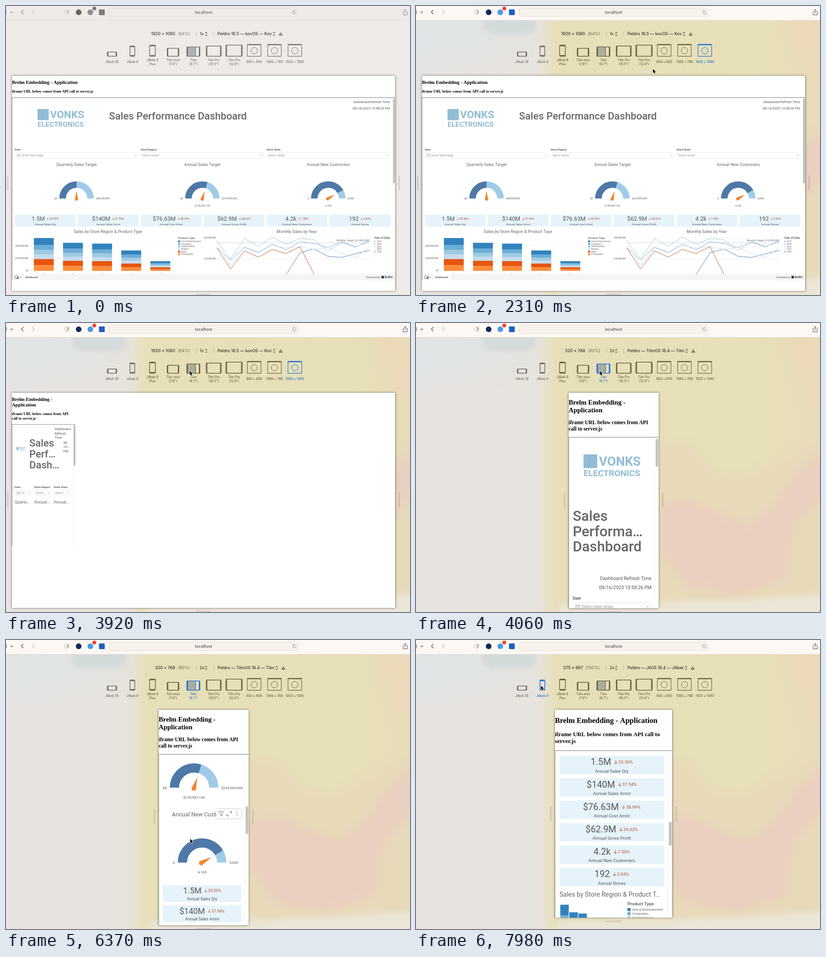
These frames come from a looping animation (884 px wide and 634 px high, 8000 ms). An HTML page with a canvas:

```html
<!DOCTYPE html>
<html lang="en">
<head>
<meta charset="utf-8">
<title>Responsive dashboard preview</title>
<style>
html, body { margin: 0; width: 100%; height: 100%; overflow: hidden; background: #efebe7; }
canvas { display: block; width: 884px; height: 634px; }
</style>
</head>
<body>
<canvas id="stage"></canvas>
<script>
const W = 884, H = 634, LOOP = 8000, STEP = 70, PAGE_TOP = 153;
const SANS = 'Roboto, sans-serif', UI = 'Inter, sans-serif', SERIF = '"Liberation Serif", serif';
const BLUE = '#1b6fdd', GREY = '#666', INK = '#555';
const canvas = document.getElementById('stage');
const ratio = window.devicePixelRatio || 1;
canvas.width = W * ratio;
canvas.height = H * ratio;
const ctx = canvas.getContext('2d');

// ---- helpers ----
function text(str, x, y, size, color = GREY, align = 'left', weight = 400, font = SANS) {
  ctx.font = `${weight} ${size}px ${font}`;
  ctx.fillStyle = color;
  ctx.textAlign = align;
  ctx.fillText(str, x, y + size * 0.35);
  return ctx.measureText(str).width;
}
function box(x, y, w, h, color, r = 0) {
  ctx.fillStyle = color;
  ctx.beginPath();
  ctx.roundRect(x, y, w, h, r);
  ctx.fill();
}
function frame(x, y, w, h, color, r = 0, width = 1) {
  ctx.strokeStyle = color;
  ctx.lineWidth = width;
  ctx.beginPath();
  ctx.roundRect(x, y, w, h, r);
  ctx.stroke();
}
function disc(x, y, r, color) {
  ctx.fillStyle = color;
  ctx.beginPath();
  ctx.arc(x, y, r, 0, 7);
  ctx.fill();
}
function line(points, color, width = 1, dash = []) {
  ctx.strokeStyle = color;
  ctx.lineWidth = width;
  ctx.setLineDash(dash);
  ctx.beginPath();
  points.forEach(([x, y]) => ctx.lineTo(x, y));
  ctx.stroke();
  ctx.setLineDash([]);
}
function shape(points, color) {
  ctx.fillStyle = color;
  ctx.beginPath();
  points.forEach(([x, y]) => ctx.lineTo(x, y));
  ctx.closePath();
  ctx.fill();
}
function at(x, y, scale, draw) {
  ctx.save();
  ctx.translate(x, y);
  ctx.scale(scale, scale);
  draw();
  ctx.restore();
}
function clipTo(x, y, w, h) {
  ctx.beginPath();
  ctx.rect(x, y, w, h);
  ctx.clip();
}
// Linear interpolation through [time, ...values] keys.
function track(keys, t) {
  const i = keys.findIndex(k => k[0] > t);
  if (i === 0) return keys[0].slice(1);
  if (i < 0) return keys[keys.length - 1].slice(1);
  const a = keys[i - 1], b = keys[i], f = (t - a[0]) / (b[0] - a[0]);
  return a.slice(1).map((v, j) => v + (b[j + 1] - v) * f);
}

// ---- window backdrop ----
const backdrop = document.createElement('canvas');
backdrop.width = W;
backdrop.height = H;
(function paintBackdrop(g) {
  const base = g.createLinearGradient(0, 0, W, 0);
  [[0, '#e7e3e1'], [.3, '#e7e3dd'], [.318, '#e7e2cf'], [.35, '#e6dfb7'], [.85, '#e7e0b8'], [1, '#e9dcb9']]
    .forEach(([p, c]) => base.addColorStop(p, c));
  g.fillStyle = base;
  g.fillRect(0, 0, W, H);
  const blob = (color, blur, points) => {
    g.filter = `blur(${blur}px)`;
    g.fillStyle = color;
    g.beginPath();
    points.forEach(([x, y]) => g.lineTo(x, y));
    g.fill();
  };
  blob('#e0e5e5', 25, [[-30, 20], [150, 20], [240, 70], [120, 110], [-30, 130]]);
  blob('#d3dada', 5, [[146, 20], [262, 20], [262, 52], [240, 62], [165, 62], [146, 50]]);
  blob('#e8dab9', 8, [[520, 275], [560, 255], [605, 268], [650, 325], [720, 335], [780, 300], [900, 240], [900, 650], [520, 650]]);
  blob('#e9cfbf', 10, [[535, 400], [595, 386], [660, 415], [730, 440], [785, 395], [830, 330], [900, 270],
    [900, 370], [830, 440], [810, 560], [700, 600], [590, 575], [535, 500]]);
  blob('#ebd9ba', 14, [[800, 20], [900, 20], [900, 220], [850, 150]]);
  blob('#ebe5d6', 7, [[310, 616], [540, 612], [720, 606], [900, 594], [900, 660], [310, 660]]);
})(backdrop.getContext('2d'));

// ---- browser chrome ----
const setups = {
  desktop: { dims: '1920 × 1080', x: 317.5, zoom: '(64%)', dpr: '1x', env: 'Peldro 16.5 — kovOS — Kov', pick: 9 },
  tablet: { dims: '320 × 768', x: 326, zoom: '(90%)', dpr: '2x', env: 'Peldro — TilmOS 16.4 — Tilm', pick: 4 },
  phone: { dims: '375 × 667', x: 322, zoom: '(100%)', dpr: '2x', env: 'Peldro — JilOS 16.4 — Jilbek', pick: 1 }
};
// [center x, width, height, kind, label lines]
const devices = [
  [232, 22, 11, 'device', 'Jilbek SE'], [276.5, 12, 24, 'device', 'Jilbek 8'], [320.5, 14, 26, 'device', 'Jilbek 8', 'Plus'],
  [365.5, 27, 19, 'device', 'Tilm mini', '(7.9")'], [410, 30, 22, 'split', 'Tilm', '(9.7")'],
  [454.5, 34, 24, 'device', 'Tilm Pro', '(10.5")'], [499, 37, 26, 'device', 'Tilm Pro', '(12.9")'],
  [543, 31, 27.5, 'screen', '800 × 600'], [587.5, 31, 27.5, 'screen', '1366 × 768'], [632, 31, 27.5, 'screen', '1920 × 1080']
];
function deviceIcon([cx, w, h, kind, ...label], color) {
  const x = cx - w / 2, y = 111 - h, wide = w > h;
  const [ix, top, bottom] = kind === 'screen' ? [1.2, 2.6, 1.2] : wide ? [3, 1.6, 1.6] : [1.5, 3.2, 3.2];
  ctx.fillStyle = color;
  ctx.beginPath();
  ctx.roundRect(x, y, w, h, kind === 'screen' ? 1 : 2.5);
  ctx.rect(x + ix, y + top, w - 2 * ix, h - top - bottom);
  ctx.fill('evenodd');
  if (kind === 'screen') frame(cx - 7, 91, 14, 14, color, 7);
  if (kind === 'split') {
    box(x + 3, y + 1.6, 16, h - 3.2, 'rgba(115,125,130,.5)');
    box(x + 19, y + 1.6, 1.2, h - 3.2, color);
  }
  label.forEach((s, i) => text(s, cx, (label.length > 1 ? 118.5 : 123) + i * 8.8, 6.9, color, 'center', 500, UI));
}
function toolbar(active) {
  const dark = active ? '#4b4846' : '#8a8683', faint = active ? '#c2bdb9' : '#cdc8c4';
  box(0, 0, W, 31, active ? '#fdf8f4' : '#f0ebe8');
  box(0, 31, W, 1, active ? '#e0d9cf' : '#dad5d1');
  box(0, 9, 1, 9, dark);
  line([[10, 12.5], [12.5, 15], [15, 12.5]], dark, 1.1);
  line([[38, 9], [33.5, 13.5], [38, 18]], dark, 1.3);
  line([[57.5, 9], [62, 13.5], [57.5, 18]], faint, 1.3);
  const shield = new Path2D('M133 8.5 L137.5 10 V14 Q137 17 133 19 Q129 17 128.5 14 V10 Z');
  ctx.strokeStyle = faint;
  ctx.lineWidth = 1;
  ctx.stroke(shield);
  ctx.save();
  clipTo(133, 5, 8, 16);
  ctx.fillStyle = faint;
  ctx.fill(shield);
  ctx.restore();
  disc(159, 13.8, 6.2, active ? '#0f2a5c' : '#666361');
  disc(184.5, 13.8, 6.2, active ? '#4a9be8' : '#908c89');
  disc(193.2, 5.6, 4.1, active ? '#f43b30' : '#6f7480');
  box(203.5, 7.5, 12.5, 12.5, active ? '#1d5fc4' : '#7d7976', 1);
  box(225.5, 4.5, 413, 18.5, active ? '#f8f2ed' : '#f1ece8', 5);
  frame(225.5, 4.5, 413, 18.5, active ? '#e3ddd7' : '#dbd6d2', 5);
  text('localhost', 432.5, 14, 8.9, active ? '#3c3937' : '#4d4a48', 'center', 400, UI);
  ctx.strokeStyle = '#8b8784';
  ctx.lineWidth = 1;
  ctx.beginPath();
  ctx.arc(630.5, 14, 3.6, -0.4, 4.8);
  ctx.stroke();
  line([[629.5, 8.8], [631.8, 10.5], [629.8, 12.3]], '#8b8784');
  line([[871, 12], [869, 12], [869, 19.5], [878, 19.5], [878, 12], [876, 12]], dark);
  line([[873.5, 16], [873.5, 7.5]], dark);
  line([[871, 9.7], [873.5, 7.2], [876, 9.7]], dark);
}
function deviceBar(mode, active) {
  const s = setups[mode], ink = active ? '#3a3620' : '#3b3937', soft = active ? '#716c50' : '#7b7774';
  const chevrons = x => {
    line([[x - 2, 59.6], [x, 57.6], [x + 2, 59.6]], ink, 1.1);
    line([[x - 2, 62.8], [x, 64.8], [x + 2, 62.8]], ink, 1.1);
  };
  const w = text(s.dims, s.x, 61, 9, ink, 'left', 500, UI);
  text(s.zoom, s.x + w + 6, 61, 9, soft, 'left', 400, UI);
  text(s.dpr, 423.8, 61, 8.8, ink, 'left', 500, UI);
  chevrons(438);
  [416.5, 454.5].forEach(x => box(x - .5, 55.5, 1, 11, active ? '#b5ae8b' : '#c4bfbb'));
  const end = 462.5 + text(s.env, 462.5, 61, 9, ink, 'left', 500, UI);
  chevrons(end + 5);
  shape([[end + 15, 65], [end + 19.5, 57], [end + 24, 65]], soft);
  box(end + 19, 59.5, 1.1, 3, '#eee6c8');
  box(end + 19, 63.2, 1.1, 1, '#eee6c8');
  devices.forEach((d, i) => deviceIcon(d, !active ? '#75716e' : i === s.pick ? BLUE : i < 2 ? '#706c66' : '#68623f'));
}

// ---- page shell ----
function page(x, w, h) {
  const grip = 'rgba(90,80,60,.17)', mid = Math.min(388, PAGE_TOP + h / 2);
  box(x - 10.5, mid - 16.5, 3, 33, grip, 1.5);
  box(x + w + 7.5, mid - 16.5, 3, 33, grip, 1.5);
  box(415, PAGE_TOP + h + 6.5, 34, 3, grip, 1.5);
  ctx.save();
  ctx.shadowColor = 'rgba(0,0,0,.6)';
  ctx.shadowBlur = 4 * ratio;
  box(x, PAGE_TOP, w, h, '#fff');
  ctx.restore();
}
// Draws both headings and returns the top of the embedded frame.
function headings(x, k, titleLines, noteLines) {
  let y = 33.6;
  titleLines.forEach((s, i) => text(s, x, PAGE_TOP + (y + 27.6 * i) * k, 24 * k, '#000', 'left', 700, SERIF));
  y += 27.6 * (titleLines.length - 1) + 45;
  noteLines.forEach((s, i) => text(s, x, PAGE_TOP + (y + 21.8 * i) * k, 18.72 * k, '#000', 'left', 700, SERIF));
  return PAGE_TOP + (y + 21.8 * (noteLines.length - 1) + 30.5) * k;
}
function frameEdges(x, top, w, h) {
  box(x, top - .5, w, 1.2, '#8e8e8e');
  box(x, top, 1, h, '#a9a9a9');
}

// ---- dashboard parts, in page units ----
const gauges = [
  ['Quarterly Sales Target', '$0', '$58,500,000', '', 0.5],
  ['Annual Sales Target', '$0', '$234,000,000', '$139,547,106', 0.596],
  ['Annual New Customers', '0', '5,000', '4,165', 0.833]
];
const kpis = [
  ['1.5M', '35.36%', 'Annual Sales Qty'], ['$140M', '37.94%', 'Annual Sales Amnt'], ['$76.63M', '38.99%', 'Annual Cost Amnt'],
  ['$62.9M', '36.62%', 'Annual Gross Profit'], ['4.2k', '7.98%', 'Annual New Customers'], ['192', '2.04%', 'Annual Stores']
];
const products = [
  ['Arts & Entertainment', '#3182bd', .21], ['Computers', '#6baed6', .15], ['Entertainment', '#9ecae1', .145],
  ['Mobiles', '#c6dbef', .14], ['Music', '#e6550d', .185], ['Photography', '#fd8d3c', .17]
];
const filters = [['Date', 'Select date range'], ['Store Region', 'Select values'], ['Store State', 'Select values']];

function logo(x, y, w) {
  const color = '#92bcd4';
  box(x, y + w * .01, w * .24, w * .24, color);
  text('VONKS', x + w * .27, y + w * .13, w * .222, color, 'left', 700);
  text('ELECTRONICS', x, y + w * .34, w * .152, color, 'left', 700);
}
function gauge([, low, high, value, part]) {
  const arc = (from, to, color) => {
    ctx.strokeStyle = color;
    ctx.lineWidth = 32.5;
    ctx.beginPath();
    ctx.arc(0, 0, 69.8, Math.PI * (1 + from), Math.PI * (1 + to));
    ctx.stroke();
  };
  arc(0, 1, '#a0cbe8');
  arc(0, part, '#4e79a7');
  ctx.save();
  ctx.rotate(Math.PI * (part - .5));
  ctx.fillStyle = '#f0862f';
  ctx.beginPath();
  ctx.moveTo(0, -38);
  ctx.lineTo(8.2, 4);
  ctx.quadraticCurveTo(7, 11, 0, 11);
  ctx.quadraticCurveTo(-7, 11, -8.2, 4);
  ctx.fill();
  ctx.restore();
  text(low, -97, 0, 12.8, INK, 'right');
  text(high, 97, 0, 12.8, INK);
  text(value, 0, 35, 12.8, INK, 'center');
}
function kpi([big, change, label], w) {
  box(0, 0, w, 59, '#e6f3fa');
  ctx.font = `400 29px ${SANS}`;
  const bigW = ctx.measureText(big).width;
  ctx.font = `400 14.4px ${SANS}`;
  let x = (w - bigW - 23 - ctx.measureText(change).width) / 2;
  const red = '#b5532f';
  text(big, x, 19.5, 29, INK);
  x += bigW + 15;
  line([[x, 14.5], [x, 25]], red, 1.5);
  line([[x - 4.5, 20.8], [x, 25.3], [x + 4.5, 20.8]], red, 1.5);
  text(change, x + 8, 20, 14.4, red);
  text(label, w / 2, 48.5, 14.3, INK, 'center');
}
function filter([label, hint], w, short) {
  const dated = label === 'Date';
  text(label, 0, -29, 14, '#444', 'left', 500);
  frame(0, -14, w, 28, '#dedede', 14, 1.4);
  if (dated) {
    frame(11, -6, 15, 13, '#999', 1.5, 1.4);
    line([[11, -2], [26, -2]], '#999', 1.4);
    line([[14, 2.5], [23, 2.5]], '#999', 2, [2, 1.5]);
  }
  text(short || hint, dated ? 32 : 8, 0, 14.4, '#999');
  shape([[w - 16, -1.5], [w - 10, -1.5], [w - 13, 2]], '#777');
}
function bars(width, step) {
  [164, 140, 136, 102, 48].forEach((h, i) => {
    let y = 164 - h;
    products.forEach(([, color, share]) => {
      box(i * step, y, width, h * share + .3, color);
      y += h * share;
    });
  });
}
function productLegend() {
  text('Product Type', 0, 0, 14.3, INK, 'left', 500);
  products.forEach(([name, color], i) => {
    box(0, 13 + 13 * i, 10, 10, color);
    text(name, 15, 18 + 13 * i, 10.7);
  });
}

// ---- wide layout, in stage pixels ----
const years = [
  ['2019', '#4a87b9', 5, [589, 541, 533, 549, 551.5, 543.5, 536]],
  ['2020', '#7db3d9', 0, [530, 557, 529, 540.5, 522, 535, 517, 521, 530, 517, 528, 516]],
  ['2021', '#9ecae1', 0, [514, 555, 510, 527, 506.5, 523, 510, 512.5, 537, 519, 529, 513]],
  ['2022', '#c9dcec', 0, [519, 568, 530, 542, 525, 531, 528, 534, 529, 543, 552, 529]],
  ['2023', '#c4602f', 0, [530, 577, 537, 551, 534, 543, 528, 588]]
];
const yearX = i => 461 + 30.4 * i;

function wideLayout() {
  const k = .4378;
  page(13, 838.5, 472);
  const top = headings(13, k, ['Brelm Embedding - Application'], ['iframe URL below comes from API call to server.js']);
  frameEdges(13, top, 838.5, 401);
  box(847, 203, 4, 186, '#c1c1c1', 2);
  box(846, 202, .6, 386, '#e8e8e8');
  logo(69, 225, 102);
  text('Sales Performance Dashboard', 225.5, 241, 22.1, GREY, 'left', 500);
  text('Dashboard Refresh Time', 840, 210.5, 7.25, INK, 'right');
  text('08/16/2023 10:58:26 PM', 840, 224, 7.3, INK, 'right');
  gauges.forEach((g, i) => {
    const cx = 154.3 + 275.4 * i;
    at(cx - 135, 327.6, k, () => filter(filters[i], 616));
    text(g[0], cx, 348, 9, GREY, 'center');
    at(cx, 422.3, k, () => gauge(g));
  });
  kpis.forEach((item, i) => at(19.5 + 137.75 * i, 458, k, () => kpi(item, 303)));

  ctx.save();
  clipTo(14, 486, 832, 102);
  text('Sales by Store Region & Product Type', 223, 494.5, 9, GREY, 'center');
  [['$200,000,000', 526.5], ['$100,000,000', 553.7], ['$0', 580.7]].forEach(([s, y]) => {
    text(s, 49, y, 4.8, INK, 'right');
    box(51, y, 319, .6, '#e4e4e4');
  });
  at(61, 509, k, () => bars(99.4, 145.6));
  for (let i = 0; i < 5; i++) text('o', 82.5 + 63.7 * i, 587.4, 4.5, INK, 'center');
  at(376.5, 508.5, k, productLegend);

  text('Monthly Sales by Year', 636, 494.5, 9, GREY, 'center');
  [['$20,000,000', 508], ['$18,000,000', 554.6]].forEach(([s, y]) => {
    text(s, 459, y, 4.8, INK, 'right');
    box(461, y, 335, .6, '#e8e8e8');
  });
  line([[461, 519.5], [796, 519.5]], '#999', .8, [1.5, 1.5]);
  years.forEach(([name, color, start, ys], i) => {
    line(ys.map((y, j) => [yearX(start + j), y]), color, 1);
    box(805, 515.8 + 5.7 * i, 4, 1.1, color);
    text(name, 811.5, 516.5 + 5.7 * i, 4.6);
  });
  text('Monthly Target: $19,500,000', 794, 514, 5.6, GREY, 'right');
  text('Year of Date', 805.5, 508.5, 6.3, INK, 'left', 500);
  ctx.restore();

  box(14, 588, 837, 14, '#f5f5f5');
  box(39, 588, 35, 14, '#fff');
  frame(19.5, 592, 7.5, 6, '#777', 1, 1);
  disc(25.5, 596.5, 2, '#555');
  shape([[29.5, 594.5], [33, 594.5], [31.2, 596.5]], '#777');
  text('Dashboard', 42, 595, 5.8, '#444', 'left', 500);
  text('Powered by', 819, 595, 5.9, INK, 'right');
  box(821.5, 592, 5.5, 5.5, '#333');
  text('brelm', 828.5, 595, 6.8, '#333', 'left', 500);
}

// Moment when the page has shrunk but the preview window has not.
function squeezedLayout() {
  const k = .4378, columns = [19, 61.5, 104];
  page(13, 838.5, 472);
  const top = headings(13, k, ['Brelm Embedding -', 'Application'], ['iframe URL below comes from API', 'call to server.js']);
  frameEdges(13, top, 139, 266);
  box(147, 223, .7, 265, '#dcdcdc');
  box(148, 224, 4, 89, '#c1c1c1', 2);
  ['Dashboard', 'Refresh', 'Time'].forEach((s, i) => text(s, 106.5, 232.7 + 9.5 * i, 7.2, INK));
  ['08…', '10:…', 'PM'].forEach((s, i) => text(s, 125.5, 262 + 9.5 * i, 7.2, INK));
  ['Sales', 'Perf…', 'Dash…'].forEach((s, i) => text(s, 51, 263 + 24 * i, 22.1, GREY, 'left', 500));
  logo(22.5, 272, 20);
  ['Se…', 'Select…', 'Select…'].forEach((s, i) => at(columns[i], 372.8, k, () => filter(filters[i], 85, s)));
  ['Quarte…', 'Annual…', 'Annual…'].forEach((s, i) => text(s, columns[i], 393, 9));
}

// ---- narrow layout, in page units ----
function narrowLayout(x, width, height, k, titleLines, noteLines, chartTitle, scroll, hover) {
  page(x, width * k, height * k);
  const top = headings(x, k, titleLines, noteLines);
  const view = height - (top - PAGE_TOP) / k, full = 3750;
  const left = 14.5, right = width - 25.8, span = right - left, mid = (left + right) / 2;
  ctx.save();
  clipTo(x, top, width * k, view * k);
  at(x, top, k, () => {
    box(width - 14, 0, 1, view, '#e6e6e6');
    box(width - 10.5, 6 + scroll * view / full, 8.8, view * view / full, '#c1c1c1', 4);
    ctx.translate(0, -scroll);
    logo(mid - 101.5, 59, 203);
    ['Sales', 'Performa…', 'Dashboard'].forEach((s, i) => text(s, left, 280.5 + 54.6 * i, 50.5, GREY, 'left', 500));
    text('Dashboard Refresh Time', right, 504, 16.6, INK, 'right');
    text('08/16/2023 10:58:26 PM', right, 535, 16.7, INK, 'right');
    gauges.forEach((g, i) => {
      at(left, 603.5 + 71.5 * i, 1, () => filter(filters[i], span));
      text(g[0], mid, 787 + 267 * i, 20.5, GREY, 'center');
      ctx.save();
      clipTo(0, 0, width - 21, full);
      at(i < 2 ? 126 : mid, 958 + 267 * i, 1, () => gauge(g));
      ctx.restore();
    });
    kpis.forEach((item, i) => at(left, 1573 + 71.9 * i, 1, () => kpi(item, span)));
    text(chartTitle, left, 2017, 20.6);
    [2090, 2151].forEach(y => box(17, y, width - 176, 1, '#e6e6e6'));
    at(17.2, 2050.5, 1, () => bars(27, 29));
    at(width - 143, 2048, 1, productLegend);
    if (hover) hoverMenu(right - 89, 1302);
  });
  ctx.restore();
  frameEdges(x, top, width * k, view * k);
}
function hoverMenu(x, y) {
  ctx.save();
  ctx.shadowColor = 'rgba(0,0,0,.3)';
  ctx.shadowBlur = 4 * ratio;
  box(x, y, 89, 32, '#fff', 3);
  ctx.restore();
  const color = '#666';
  line([[x + 9, y + 8], [x + 25, y + 8], [x + 19, y + 16], [x + 19, y + 24], [x + 15, y + 22], [x + 15, y + 16], [x + 8.5, y + 8]], color, 1.5);
  text('1', x + 21, y + 21, 8, color);
  line([[x + 38, y + 23], [x + 53, y + 9]], color, 1.5, [7, 6]);
  line([[x + 47, y + 8], [x + 54, y + 8], [x + 54, y + 15]], color, 1.5);
  line([[x + 37, y + 17], [x + 37, y + 24], [x + 44, y + 24]], color, 1.5);
  [10, 16, 22].forEach(dy => disc(x + 73, y + dy, 1.4, color));
}

// ---- pointer ----
const pointerPath = [
  [350, 536, 588], [700, 620, 350], [980, 700, 150], [1120, 713, 118], [1750, 713, 118], [2030, 625, 130], [2310, 518.5, 138],
  [2590, 438, 114], [2660, 438, 113], [2800, 438, 113], [3150, 437, 107], [3290, 438, 106], [3360, 438, 106],
  [3640, 402, 105], [4340, 402, 105], [4550, 414, 280], [4690, 403, 436], [6720, 403, 436],
  [7140, 307.5, 188], [7420, 273.5, 100]
];
function pointer(t) {
  if (t < 350) return;
  const [x, y] = track(pointerPath, t);
  if (t >= 4620 && t < 5530) {
    line([[x - 2, y - 5], [x, y - 4], [x + 2, y - 5]], '#333', 1);
    line([[x, y - 4], [x, y + 4]], '#333', 1);
    line([[x - 2, y + 5], [x, y + 4], [x + 2, y + 5]], '#333', 1);
    return;
  }
  const arrow = [[0, 0], [0, 9], [2, 7.2], [3.5, 10.6], [5.1, 9.9], [3.7, 6.7], [6.4, 6.5]].map(([a, b]) => [x + a, y + b]);
  line([...arrow, arrow[0], arrow[1]], '#fff', 1.4);
  shape(arrow, '#000');
}

const scrollPath = [
  [5180, 0], [5250, 130], [5320, 390], [5390, 520], [5740, 520], [5810, 700], [5880, 950], [5950, 1067],
  [6300, 1067], [6370, 1106], [6440, 1260], [6510, 1260], [6580, 1554]
];

function draw(t) {
  const active = t >= 1260;
  const mode = t < 3990 ? 'desktop' : t < 7840 ? 'tablet' : 'phone';
  ctx.setTransform(ratio, 0, 0, ratio, 0, 0);
  box(0, 0, W, H, '#eeeae6');
  if (active) ctx.drawImage(backdrop, 0, 0);
  toolbar(active);
  deviceBar(mode, active);
  if (t < 3850) wideLayout();
  else if (mode === 'desktop') squeezedLayout();
  else if (mode === 'tablet') {
    narrowLayout(334, 320, 768, .6156, ['Brelm Embedding -', 'Application'], ['iframe URL below comes from API', 'call to server.js'],
      'Sales by Store Region & Pro…', track(scrollPath, t)[0], t >= 6160 && t < 6580);
  } else {
    narrowLayout(304, 375, 667, .684, ['Brelm Embedding - Application'], ['iframe URL below comes from API call to', 'server.js'],
      'Sales by Store Region & Product T…', 1556, false);
  }
  pointer(t);
}

const start = performance.now();
function tick() {
  const elapsed = (performance.now() - start) % LOOP;
  draw(Math.floor(elapsed / STEP) * STEP);
  requestAnimationFrame(tick);
}
tick();
</script>
</body>
</html>
```
